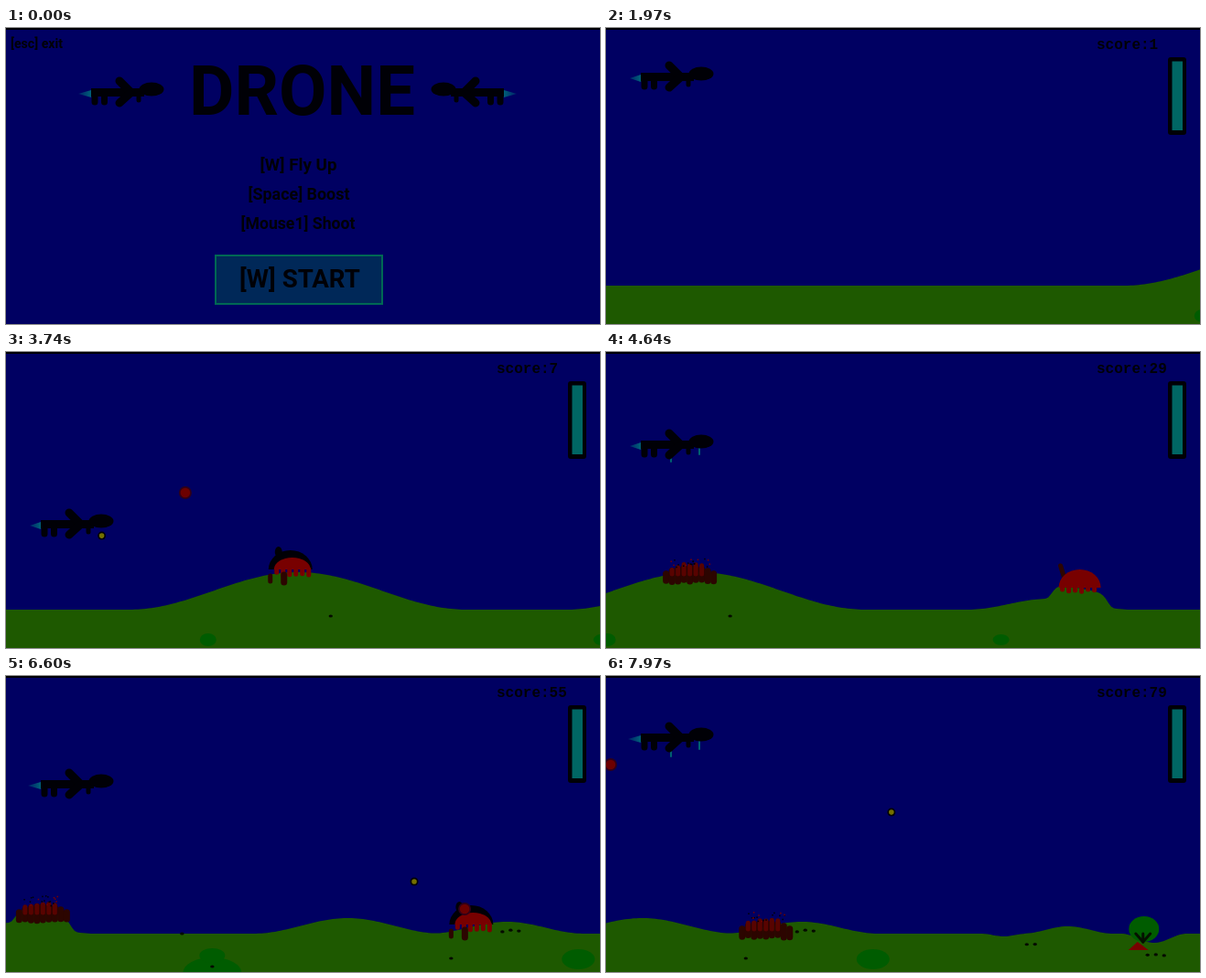
Write an HTML page with a canvas that moves like this. It is 649 px wide and 324 px high and loops after 8 s.

```html
<!DOCTYPE html>
<html lang="en">
<head>
<meta charset="utf-8">
<title>Drone</title>
<style>
  html, body { margin: 0; width: 100%; height: 100%; overflow: hidden; background: #000062; }
  canvas { display: block; }
</style>
</head>
<body>
<canvas id="stage" width="649" height="324"></canvas>
<script>
const W = 649, H = 324, LOOP = 8000, GAME_START = 1400;
const SCROLL_SPEED = .2435, BALL_SPEED = .38, GROUND = 282;
const SKY = '#000062', GRASS = '#1e5900', MOSS = '#005c00', INK = '#000006', RED = '#780000', RUST = '#2c0500';
const ctx = document.getElementById('stage').getContext('2d');

// Heights the drone passes, as [time, y]; it glides between them.
const flightKeys = [[1400, 75], [1970, 55], [3740, 190], [4640, 103], [5600, 93], [6600, 120], [7970, 69], [8000, 68]];

const hills = [
  { x: 750, half: 185, rise: 41 },
  { x: 1135, half: 90, rise: 12 },
  { x: 1501, half: 103, rise: 17 },
  { x: 1675, half: 85, rise: 13 },
  { x: 1896, half: 25, rise: -3 },
  { x: 1966, half: 50, rise: 8 },
  { x: 2060, half: 36, rise: -10 }
];
const enemies = [
  { look: tank, x: 742, y: 234, fires: 2840, dies: 3990 },
  { look: bunker, x: 1168, y: 250, dies: 5170 },
  { look: tank, x: 1636, y: 268, fires: 6540, dies: 6675 },
  { look: plant, x: 2048, y: 276, dies: Infinity }
];
// The drone's bullets: when they leave, and when and where in the world they hit.
const bullets = [
  { fired: 3740, hit: 3990, x: 742, y: 232 },
  { fired: 4700, hit: 5170, x: 1168, y: 252 },
  { fired: 4960, hit: 5520, x: 1311, y: 288 },
  { fired: 6030, hit: 6675, x: 1636, y: 239 },
  { fired: 7620, hit: 8300, x: 2048, y: 200 }
];

const noise = n => { const v = Math.sin(n * 127.1) * 43758.5453; return v - Math.floor(v); };
const lerp = (a, b, u) => a + (b - a) * u;
const scrollAt = t => (t - 1970) * SCROLL_SPEED;

function flight(t) {
  const k = flightKeys;
  let i = 0;
  while (i < k.length - 2 && t >= k[i + 1][0]) i++;
  const slope = j => {
    const [ta, a] = k[Math.max(0, j - 1)], [tb, b] = k[Math.min(k.length - 1, j + 1)];
    return (b - a) / (tb - ta);
  };
  const d = k[i + 1][0] - k[i][0], u = (t - k[i][0]) / d, v = 1 - u;
  return v * v * (1 + 2 * u) * k[i][1] + u * u * (3 - 2 * u) * k[i + 1][1]
    + u * v * d * (v * slope(i) - u * slope(i + 1));
}
const climbing = t => flight(t + 10) - flight(t - 10) < -.6;

function groundY(x) {
  const plinth = 15 * Math.exp(-(((x - 1168) / 31) ** 8));
  return hills.reduce((y, h) => {
    const d = Math.abs(x - h.x) / h.half;
    return d < 1 ? y - h.rise * Math.cos(d * Math.PI / 2) ** 2 : y;
  }, GROUND - plinth);
}

function rect(x, y, w, h, fill) { ctx.fillStyle = fill; ctx.fillRect(x, y, w, h); }
function poly(points, fill) {
  ctx.beginPath();
  points.forEach(([x, y]) => ctx.lineTo(x, y));
  ctx.fillStyle = fill;
  ctx.fill();
}
function oval(x, y, rx, ry, fill, from = 0, to = Math.PI * 2) {
  ctx.beginPath();
  ctx.ellipse(x, y, rx, ry, 0, from, to);
  ctx.fillStyle = fill;
  ctx.fill();
}
function bar(x1, y1, x2, y2, width, color, cap = 'round') {
  ctx.beginPath();
  ctx.moveTo(x1, y1);
  ctx.lineTo(x2, y2);
  ctx.lineWidth = width;
  ctx.lineCap = cap;
  ctx.strokeStyle = color;
  ctx.stroke();
}
function at(x, y, draw) {
  ctx.save();
  ctx.translate(x, y);
  draw();
  ctx.restore();
}

// Of the installed condensed faces, take the narrowest.
const faces = ['extra-condensed 100px "Noto Sans"', 'condensed 100px "Open Sans"', 'condensed 100px Roboto'];
const widthIn = (face, str) => { ctx.font = '600 ' + face + ', sans-serif'; return ctx.measureText(str).width; };
const face = faces.sort((a, b) => widthIn(a, 'DRONE') - widthIn(b, 'DRONE'))[0];

// Largest size that fits the width, centred on the given point.
function label(str, cx, cy, width, weight = 700) {
  const font = size => `${weight} ${face.replace('100px', size + 'px')}, sans-serif`;
  ctx.font = font(100);
  ctx.font = font(width / ctx.measureText(str).width * 100);
  ctx.textAlign = 'center';
  const m = ctx.measureText(str);
  ctx.fillStyle = INK;
  ctx.fillText(str, cx, cy + (m.actualBoundingBoxAscent - m.actualBoundingBoxDescent) / 2);
}

function drone(t, thrust) {
  const flicker = Math.floor(t / 67) % 2 * 2;
  const flame = ctx.createLinearGradient(-14, 0, 0, 0);
  flame.addColorStop(0, '#00206a');
  flame.addColorStop(1, '#006078');
  poly([[flicker - 14, 0], [0, -4], [0, 4]], flame);
  if (thrust) [[33, 19], [64, 11]].forEach(([x, y]) => bar(x, y - 8, x, y - flicker, 2, '#006070'));

  rect(0, -6, 58, 9, INK);
  oval(66, -5, 13.5, 7.5, INK);
  [4, 14.5].forEach(x => bar(x, 0, x, 9, 7, INK));
  bar(31, -14, 43, -2, 9, INK);
  bar(31, 10, 42, 0, 9, INK);
  bar(52, 0, 52, 7, 5, INK);
}

function drips(from, to, y, color) {
  for (let x = from; x <= to; x += 7) bar(x, y, x, y + 3 + noise(x) * 4, 5, color);
}
function tank() {
  oval(0, 4, 24, 21, INK, Math.PI, 0);
  oval(-13, -15, 4, 6, INK);
  oval(2, 4, 20, 13, RED, Math.PI, 0);
  drips(-15, 20, 4, RED);
  bar(-7, 10, -7, 18, 7, RUST);
  bar(-22, 11, -22, 17, 5, RUST);
}
function bunker() {
  bar(-21, -16, -17, -3, 5, RUST);
  oval(0, 8, 23, 20, RED, Math.PI, 0);
  drips(-19, 19, 6, RED);
}
function plant() {
  oval(1, 1, 16.5, 14, MOSS);
  poly([[-16, 24], [-6, 15], [6, 24]], RED);
  [-8, 0, 8].forEach(x => bar(x, 6, 0, 15, 3, '#051000'));
}

function wreck(t, seed) {
  for (let i = 0; i < 9; i++) {
    const x = i * 6.5 - 26, arch = 9 * (1 - (x / 30) ** 2);
    bar(x, 8 + noise(seed + i) * 3, x, 4 - arch, 7, RUST);
    if (i > 0 && i < 7) bar(x, 2, x, -arch + noise(seed + i) * 3, 5, '#580300');
  }
  const beat = Math.floor(t / 100);
  for (let i = 0; i < 20; i++) {
    const n = seed + i * 7 + beat * 31;
    rect(noise(n) * 44 - 22, -6 - noise(n + 3) * 11, 1.5, 1.5, i % 3 ? INK : RED);
  }
}

function blast(age) {
  const r = 8 + Math.min(1, age / 80) * 6;
  const star = (size, fill) => poly(Array.from({ length: 20 }, (_, i) => {
    const a = i * Math.PI / 10, q = size * (i % 2 ? .84 : 1);
    return [q * Math.cos(a), q * Math.sin(a)];
  }), fill);
  ctx.globalAlpha = Math.min(1, (280 - age) / 120);
  star(r, '#640000');
  star(r * .78, '#823500');
  oval(0, 0, r * .5, r * .5, '#8c7440');
}

function ground(scroll) {
  const edge = [];
  for (let x = 0; x <= W + 4; x += 3) edge.push([x + scroll, groundY(x + scroll)]);
  poly([...edge, [scroll + W + 4, H], [scroll, H]], GRASS);

  oval(652, 315, 9, 7, MOSS);
  oval(1082, 315, 9, 6, MOSS);
  oval(1353, 325, 32, 17, MOSS);
  oval(1353, 306, 14, 8, MOSS);
  oval(1753, 310, 18, 11, MOSS);

  // Lone pebbles, then short trails of them.
  const pebble = (x, y) => oval(x, y, 2.2, 1.6, '#050b00');
  [[786, 289], [1320, 282], [1353, 318], [1614, 309]].forEach(p => pebble(...p));
  [[1670, 278, 3], [1921, 292, 2], [2053, 304, 3]].forEach(([x, y, n]) => {
    for (let i = 0; i < n; i++) pebble(x + i * 9, y + noise(x + i) * 2);
  });
}

function ball(x, y, r, rim, fill) {
  oval(x, y, r, r, rim);
  oval(x, y, r - 1.7, r - 1.7, fill);
}
function playerBullet(b, t) {
  if (t < b.fired || t >= b.hit) return;
  const u = (t - b.fired) / (b.hit - b.fired);
  ball(lerp(104, b.x - scrollAt(b.hit), u), lerp(flight(b.fired) + 11, b.y, u), 4.5, INK, '#747000');
}
// Enemies aim at where the drone is when they fire.
function enemyBall(e, t) {
  if (!(t >= e.fires)) return;
  const x = e.x - scrollAt(e.fires), y = e.y - 6;
  const angle = Math.atan2(flight(e.fires) - y, 78 - x), far = (t - e.fires) * BALL_SPEED;
  ball(x + far * Math.cos(angle), y + far * Math.sin(angle), 7, '#300018', '#6c0000');
}

function menu(t) {
  label('[esc] exit', 33.5, 16, 57);
  label('DRONE', 323.5, 67.5, 247, 600);
  at(93, 72, () => drone(t));
  at(544, 72, () => { ctx.scale(-1, 1); drone(t); });
  label('[W] Fly Up', 319.5, 150, 84);
  label('[Space] Boost', 320, 182, 111);
  label('[Mouse1] Shoot', 319, 213, 125);
  rect(228, 248, 184, 55, '#002858');
  ctx.strokeStyle = '#006854';
  ctx.lineWidth = 2;
  ctx.strokeRect(229, 249, 182, 53);
  label('[W] START', 321, 275, 132);
}

function hud(t) {
  const kills = enemies.filter(e => t >= e.dies).length;
  const score = Math.floor((t - GAME_START) / 333) + kills * 20;
  ctx.font = 'bold 16px "Liberation Mono", monospace';
  ctx.textAlign = 'left';
  ctx.fillStyle = INK;
  ctx.fillText('score:' + score, 536, 23);
  ctx.beginPath();
  ctx.roundRect(614, 32, 20, 85, 3);
  ctx.fill();
  rect(618.5, 36.5, 11.5, 75.5, '#006664');
}

function game(t) {
  const scroll = scrollAt(t);
  at(-scroll, 0, () => {
    ground(scroll);
    enemies.forEach(e => {
      if (t < e.dies) at(e.x, e.y, e.look);
      else at(e.x, e.y + 7, () => wreck(t, e.x));
    });
    bullets.forEach(b => {
      const age = t - b.hit;
      if (age >= 0 && age < 280) at(b.x, b.y, () => blast(age));
    });
  });
  at(38, flight(t), () => drone(t, climbing(t)));
  bullets.forEach(b => playerBullet(b, t));
  enemies.forEach(e => enemyBall(e, t));
  hud(t);
}

function render(t) {
  rect(0, 0, W, H, SKY);
  if (t < GAME_START) menu(t); else game(t);
  rect(0, 0, W, 2, INK);
}

const origin = performance.now();
function tick() {
  render((performance.now() - origin) % LOOP);
  requestAnimationFrame(tick);
}
tick();
</script>
</body>
</html>
```
